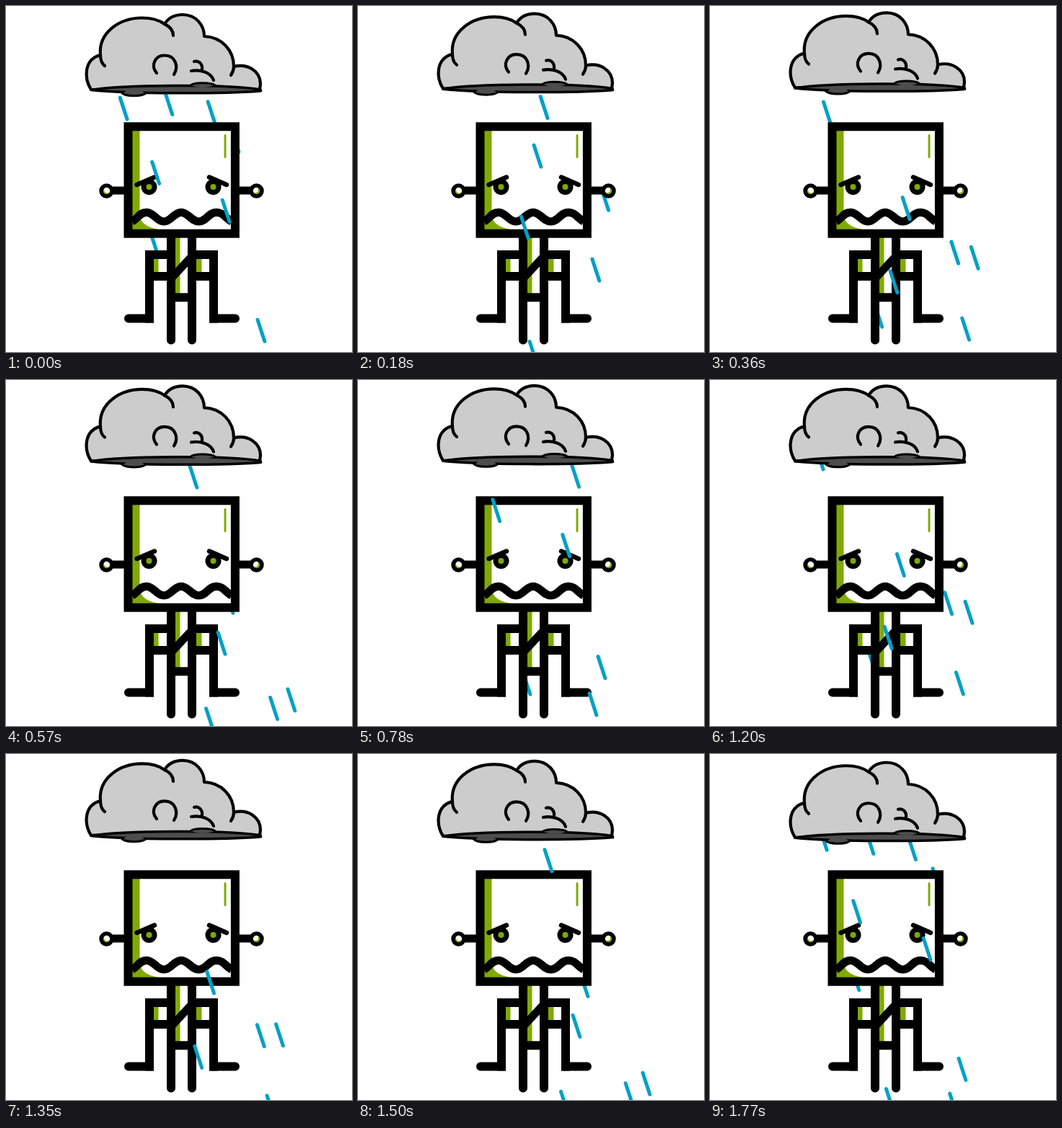
Animation of 480 by 480 pixels, one loop 1.8 s. Source, as an HTML page:

```html
<!DOCTYPE html>
<html lang="en">
<head>
<meta charset="utf-8">
<title>Robot in the rain</title>
<style>
  html, body { margin: 0; width: 100%; height: 100%; overflow: hidden; background: #fff; }
  svg { display: block; width: 100vw; height: 100vh; }
  .ink { fill: none; stroke: #000; stroke-width: 12; }
  .round { stroke-linecap: round; }
  .green { fill: #80aa00; }
  .white { fill: #fff; }
  .rain { stroke: #00a0c6; stroke-width: 5; stroke-linecap: round; }
  #cloud { stroke: #000; stroke-width: 4.2; stroke-linecap: round; stroke-linejoin: round; fill: none; }
  #cloud .puff { fill: #ccc; }
  #cloud .base { fill: #4d4d4d; stroke-width: 3.5; }
</style>
</head>
<body>
<svg viewBox="0 0 480 480">
  <g id="back" class="rain"></g>

  <g id="robot">
    <!-- arms -->
    <path class="white" d="M199 345H288V375H199Z"/>
    <path class="green" d="M205 351h6.500v18h-6.500zM264 351h7.500v18h-7.500z"/>
    <path class="ink round" d="M170 433.500H199V345H229M318 433.500H288V345H258"/>
    <path class="ink" d="M199 375H229M258 375H288M199 428V439.500M288 428V439.500"/>
    <!-- torso and legs -->
    <path class="white" d="M229 318H258V404H229Z"/>
    <path class="green" d="M235 320h6.500v79h-6.500z"/>
    <path class="ink round" d="M229 318V463.500M258 318V463.500"/>
    <path class="ink" d="M229 404.300H258"/>
    <path class="ink" d="M230 377L258 347" style="stroke-width:11"/>
    <!-- ears -->
    <path class="ink" d="M147 256H166M321 256H341" style="stroke-width:11"/>
    <circle class="green" cx="139.500" cy="256.500" r="7"/>
    <circle class="white" cx="140.500" cy="255" r="4.500"/>
    <circle class="green" cx="347.500" cy="256.500" r="7"/>
    <circle class="white" cx="346" cy="255" r="4"/>
    <g class="ink" style="stroke-width:5.500">
      <circle cx="139.500" cy="256.500" r="7.500"/>
      <circle cx="347.500" cy="256.500" r="7.500"/>
    </g>
    <!-- head -->
    <path class="white" d="M169 167H318V316H169Z"/>
    <path class="green" d="M175 172H185.500V290Q187 306 212 310H175Z"/>
    <path d="M304 179.500V209.500" stroke="#80aa00" stroke-width="3" stroke-linecap="round"/>
    <rect class="ink" x="169.500" y="167.300" width="148.400" height="148.400"/>
    <!-- face -->
    <circle cx="198.500" cy="251" r="11"/>
    <circle cx="287.500" cy="251" r="11"/>
    <circle class="green" cx="198.500" cy="251" r="4"/>
    <circle class="green" cx="287.500" cy="251" r="4"/>
    <path class="ink round" d="M181.500 248L206 237.500M306 248L282 237.500" style="stroke-width:6.500"/>
    <path class="ink" style="stroke-width:11.200"
      d="M175 299C183 295 185 286.300 195 286.300S209 299 219 299 233 286.300 243 286.300 257 299 267.500 299 281 286.300 291.500 286.300 304 294 313 299"/>
  </g>

  <g id="front" class="rain"></g>

  <g id="cloud">
    <path class="puff" d="M118 116C108 100 108 74 131 68C128 37 157 16.500 189 16.500C203 16.500 213 20 220 25C226 15 236 12 245 12C264 12 275 27 275 42C299 43 316 61 316 84C336 79 353 91 353 108L352 116Z"/>
    <path d="M131 68C131 75 133 80 137 83M220 25C228 29 232 34 232 41M316 84C316 90 314 93 312 96"/>
    <path d="M209 93C200 82 207 68.500 220 68.500C235 68.500 240 84 233 95"/>
    <path d="M261 77C267 75 273 80 272 88M257 90C268 88 284 91 288 103"/>
    <path class="base" d="M160 119C163 126 192 126 195 119Z"/>
    <path class="base" d="M118 116.500C160 109 310 108 353 116C354 118 354 118 352 118C300 122 170 122 118 116.500Z"/>
    <path fill="#4d4d4d" stroke="none" d="M163 121L167 117H188L192 121Q178 125 163 121ZM256 110Q273 102 290 110Q273 116 256 110Z"/>
    <path d="M256 110C260 105.500 285 105.500 290 110" stroke-width="3"/>
  </g>
</svg>
<script>
  const LOOP = 1800, SHOWER = 900, STEP = 30, CLOUD_BASE = 120;

  // Drops of one shower: time and x where they leave the cloud, speed in px per ms
  const shower = {
    back: [[96, 252, .43], [293, 156, .65], [610, 156, .8], [716, 298, .45], [820, 278, .54], [853, 159, .8]],
    front: [[505, 256, .455], [598, 173, .42], [823, 221, .403]]
  };

  // Faster drops also drift further with the wind
  const drift = speed => .06 + .17 * speed;

  function addDrop(layer, leave, x, speed) {
    const line = document.createElementNS("http://www.w3.org/2000/svg", "path");
    line.setAttribute("d", "M-10 -30.500L-.2 -.5");
    document.getElementById(layer).append(line);
    return { line, leave, x, speed };
  }

  // Each shower falls twice per loop
  const drops = Object.entries(shower).flatMap(([layer, list]) =>
    list.flatMap(([leave, x, speed]) =>
      [leave, leave + SHOWER].map(at => addDrop(layer, at, x, speed))));

  const cloud = document.getElementById("cloud");
  const move = (el, x, y) => el.setAttribute("transform", `translate(${x} ${y})`);

  function draw(time) {
    const t = Math.floor(time % LOOP / STEP) * STEP;
    for (const { line, leave, x, speed } of drops) {
      const age = (t - leave + LOOP) % LOOP;
      move(line, x + drift(speed) * age, CLOUD_BASE + speed * age);
    }
    move(cloud, 0, -4.3 * Math.sin(Math.PI * t / LOOP));
  }

  const start = performance.now();
  function tick() {
    draw(performance.now() - start);
    requestAnimationFrame(tick);
  }
  tick();
</script>
</body>
</html>
```
